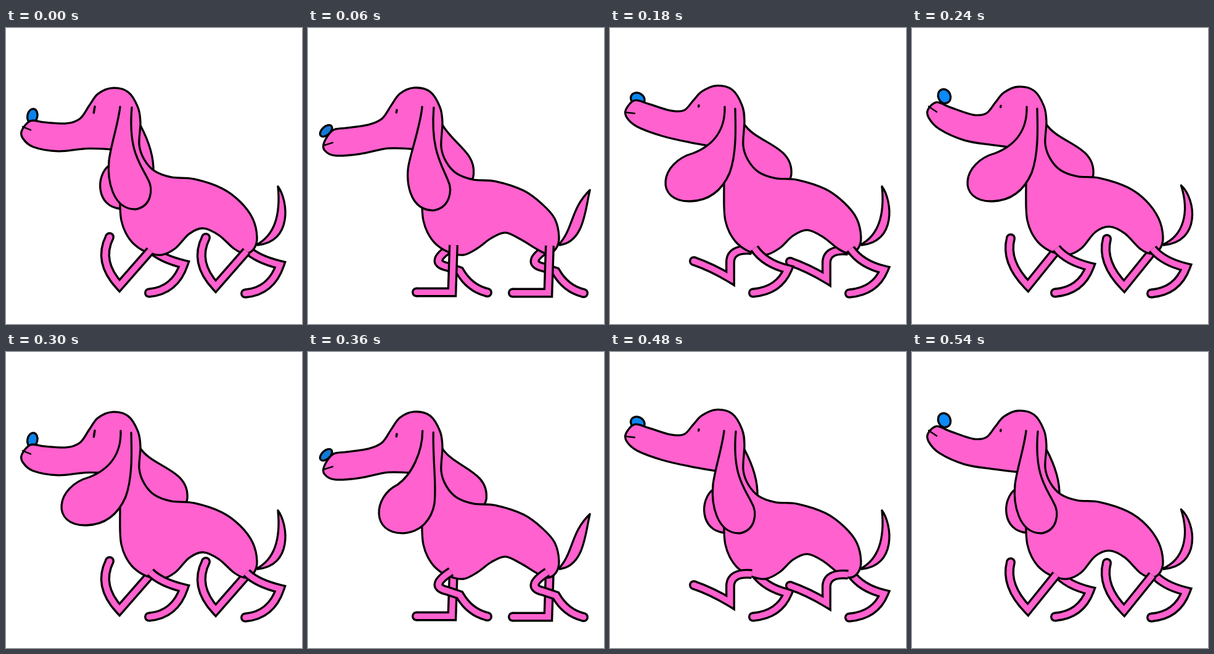
An HTML page with a canvas that plays this animation: 480 by 480 pixels, repeating every 600 ms.

```html
<!DOCTYPE html>
<html>
<head>
<meta charset="utf-8">
<style>
html, body { margin: 0; width: 100%; height: 100%; overflow: hidden; background: #fff; }
canvas { display: block; }
</style>
</head>
<body>
<canvas id="stage" width="480" height="480"></canvas>
<script>
const ctx = document.getElementById('stage').getContext('2d');
const PINK = '#ff61ce', INK = '#000';
const LOOP = 600, STEP = 60, BOB_STEPS = 5;

// Resting outline: head from chin round to the nape, then the trunk.
const head = [172,195, 130,191, 85,190, 44,182, 27,169, 26,156, 40,140, 62,142, 98,146,
  120,141, 135,122, 149,105, 172,95.5, 198,102, 214,127, 218,152];
const back = [216,188, 224,212, 241,231, 268,241, 305,244, 350,259, 380,281];
const rump = [400,309, 407,339, 402,358, 388,366, 370,358];
const belly = [345,334, 320,323, 297,332];
const chest = [275,357, 252,368, 227,363, 207,350, 194,332, 187,312, 185,290, 185,250];

// Ears hanging and flung out: a start point and four Bezier segments.
const nearEar = {
  down: [185,128, 182,155, 170,190, 167,215, 164,245, 172,294, 210,294, 235,290, 240,262, 230,245, 218,220, 198,200, 204,129],
  out: [186,128, 187,165, 168,190, 135,203, 80,218, 72,282, 130,281, 165,280, 184,258, 194,235, 205,205, 204,165, 203,131]
};
const farEar = {
  down: [218,158, 235,190, 240,215, 239,235, 239,262, 215,293, 185,293, 147,290, 144,240, 168,222, 185,205, 200,180, 205,150],
  out: [217,155, 238,188, 298,190, 294,238, 290,262, 255,272, 240,272, 225,270, 210,240, 205,220, 205,200, 205,180, 205,150]
};

// Leg drawings run hip, ankle, toe; two of them are adjustable.
const lift = d => `M234 361L${184 + d} 418Q${148 + d / 2} 379 ${168 - 2 * d} ${339 + d / 2}`;
const trail = y => `M234 357Q251 ${y - 9} 288.5 ${y}Q274 426 232 429.5`;
const stride = [
  lift(0),
  'M236 352L233.5 428.5L176 428.5',
  'M238 358Q242 388 272 411Q255 431 216 430',
  trail(391), trail(387), trail(383),
  'M232 356C210 370 203 382 225 387L246 394Q262 422 291 429',
  'M227 356C215 340 198 335 203 357L211 384Q190 398 162 407',
  'M230 360C208 358 194 364 195 382L195 406Q165 388 136 378',
  lift(4)
].map(d => ({ path: new Path2D(d), toe: d.match(/[\d.]+/g).slice(-2).map(Number) }));

const drop = (points, dy) => points.map((v, i) => i % 2 ? v + dy : v);

function bezier(p) {
  const path = new Path2D();
  path.moveTo(p[0], p[1]);
  for (let i = 2; i < p.length; i += 6) path.bezierCurveTo(...p.slice(i, i + 6));
  return path;
}

// Catmull-Rom curve through the points
function smooth(p) {
  const n = p.length / 2, curve = [p[0], p[1]];
  const at = (i, axis) => p[Math.max(0, Math.min(n - 1, i)) * 2 + axis];
  for (let i = 0; i < n - 1; i++) {
    const out = a => at(i, a) + (at(i + 1, a) - at(i - 1, a)) / 6;
    const into = a => at(i + 1, a) - (at(i + 2, a) - at(i, a)) / 6;
    curve.push(out(0), out(1), into(0), into(1), at(i + 1, 0), at(i + 1, 1));
  }
  return bezier(curve);
}

// Swings an ear between its two shapes along a sagging arc.
function ear({ down, out }, amount, sag) {
  const arc = sag * Math.sin(Math.PI * amount);
  return bezier(down.map((v, i) => v + (out[i] - v) * amount + (i % 2 && i > 3 && i < 22 ? arc : 0)));
}

function line(path, width = 3.3) {
  ctx.lineCap = ctx.lineJoin = 'round';
  ctx.strokeStyle = INK;
  ctx.lineWidth = width;
  ctx.stroke(path);
}

function shape(path, color = PINK) {
  ctx.fillStyle = color;
  ctx.fill(path);
  line(path);
}

// The hind leg repeats the foreleg.
function legs({ path, toe }) {
  for (const [dx, dy] of [[156, 1], [0, 0]]) {
    ctx.save();
    ctx.translate(dx, dy);
    ctx.lineCap = 'butt';
    ctx.lineJoin = 'miter';
    for (const [color, width] of [[INK, 16], [PINK, 9.2]]) {
      ctx.strokeStyle = ctx.fillStyle = color;
      ctx.lineWidth = width;
      ctx.stroke(path);
      ctx.beginPath();
      ctx.arc(...toe, width / 2, 0, 7);
      ctx.fill();
    }
    ctx.restore();
  }
}

function draw(t) {
  const step = Math.floor(t / STEP), phase = step % BOB_STEPS;
  const wave = lag => Math.cos((phase - lag) * 2 * Math.PI / BOB_STEPS);

  // The ears swing once per loop, with an extra drawing every 120 ms.
  const earTime = Math.max(step * STEP, Math.floor((t - 30) / 120) * 120 + 30);
  const reach = (Math.cos((earTime - 240) * 2 * Math.PI / LOOP) + 0.55) / 1.35;
  const u = Math.max(0, Math.min(1, reach));
  const swing = u * u * (3 - 2 * u);

  ctx.fillStyle = '#fff';
  ctx.fillRect(0, 0, 480, 480);

  shape(ear(farEar, swing ** 0.25, 0));

  const wag = Math.tanh(2 * wave(1.5));
  shape(new Path2D(`M407 351C${435 - 5 * wag} ${331 - 6 * wag} ${438 - 13 * wag} ${296 - 4 * wag}
    ${447 + 11 * wag} ${259 + 4 * wag}C${455 - 6 * wag} ${286 + 9 * wag} ${458 - 11 * wag} 347 408 352`));

  legs(stride[(step + 5) % 10]);

  const nose = new Path2D(), shade = wave(1.4);
  nose.ellipse(40 + 12.5 * wave(-1.07), 137 + 30 * wave(1.1), 11.7, 8.4 + 1.7 * wave(3.6),
    -1.37 + phase * Math.PI / BOB_STEPS, 0, 7);
  shape(nose, `hsl(208 ${89 - 6 * shade}% ${48 - 3 * shade}%)`);

  // The nod travels along the snout and grows towards its tip.
  const nodding = head.map((v, i) => {
    if (i % 2 === 0) return v;
    const along = Math.max(0, (150 - head[i - 1]) / 125);
    return v + (2 + 28 * along ** 1.15) * wave(0.35 + 0.65 * along);
  });
  const bob = 5 + 6 * wave(1.7);
  shape(smooth([...nodding, ...drop(back, bob * 0.55), ...rump, ...drop(belly, bob), ...chest]));

  legs(stride[step]);

  const lip = 158 + 33 * wave(1.2), eyeY = 130.5 + 4.5 * wave(0.9);
  line(new Path2D(`M27 ${lip}L40 ${lip + 1 - 8 * wave(1.7)}`), 2.5);
  const squint = [5, 2, 6, 1, 1][phase];
  line(new Path2D(`M144 ${eyeY - squint}L${144 - squint / 3} ${eyeY + squint}`), 3.5);

  shape(ear(nearEar, swing, 11));
}

function tick() {
  draw(performance.now() % LOOP);
  requestAnimationFrame(tick);
}
tick();
</script>
</body>
</html>
```
